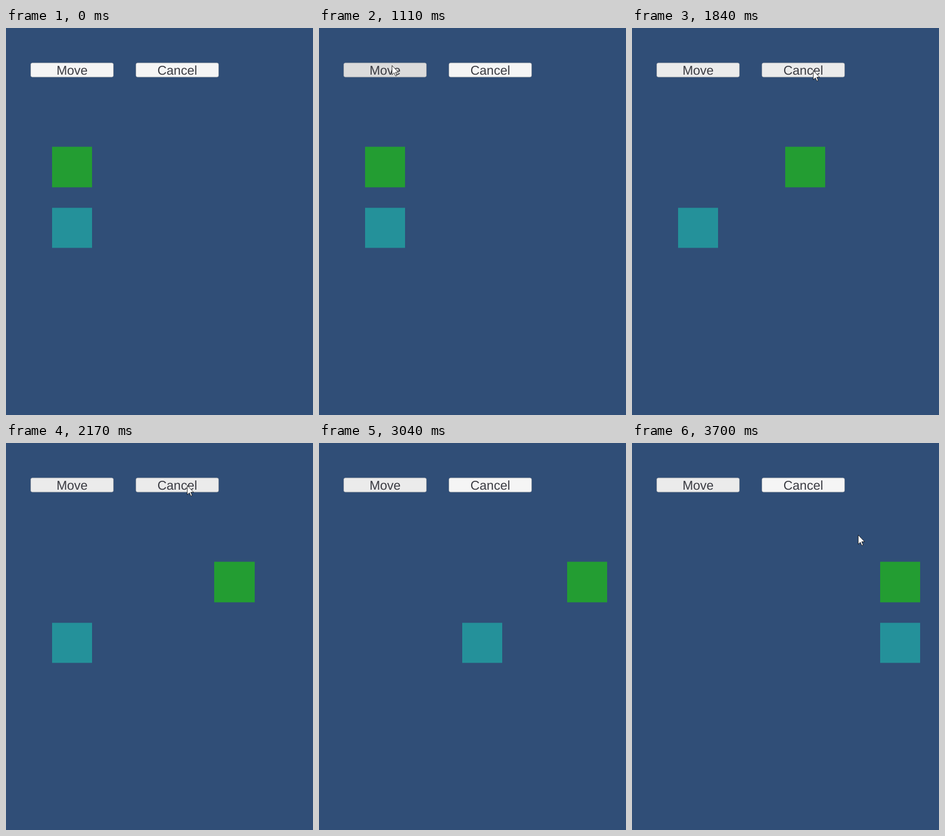
Recreate the animation shown at these times as an HTML page. Size 553 by 696 pixels, loop 3770 ms.

```html
<!DOCTYPE html>
<html lang="en">
<head>
<meta charset="utf-8">
<title>Move and Cancel</title>
<style>
  html, body { margin: 0; width: 100%; height: 100%; overflow: hidden; background: #304e77; }
  svg { display: block; width: 553px; height: 696px; }
  text {
    font: 23px "Liberation Sans", Arial, sans-serif;
    fill: #3a3b42;
    text-anchor: middle;
    text-rendering: geometricPrecision;
  }
  .button { stroke: #96989a; stroke-width: .6; }
</style>
</head>
<body>
<svg viewBox="0 0 553 696">
  <rect class="button" id="move" x="44.5" y="62.8" width="149" height="25.4" rx="3"/>
  <text x="119" y="84">Move</text>
  <rect class="button" id="cancel" x="234" y="62.8" width="149" height="25.4" rx="3"/>
  <text x="308.5" y="84">Cancel</text>
  <rect id="green" y="213.6" height="72.9" fill="#239d32"/>
  <rect id="teal" y="323.4" height="72" fill="#24919a"/>
  <path id="cursor" d="M.5 .5V17L4.3 13.5 7 19.4 9.4 18.4 6.8 12.6H12Z"
        fill="#fff" stroke="#000" stroke-width=".8"/>
</svg>
<script>
// The picture advances in steps, about fifteen per second.
const LOOP = 3770, START = 176, STEP = 66.4;
const SIZE = 72.5, LEFT = 82.7, TRAVEL = 363.9, SPEED = 19.9;
const NORMAL = 245, HOVER_DIP = 10, PRESS_DIP = 52;

const el = id => document.getElementById(id);
const ramp = (t, from, to) => Math.min(1, Math.max(0, (t - from) / (to - from)));
const smooth = u => u * u * (3 - 2 * u);

// Each glide leads from the previous resting place; lift bows its path upward.
const glides = [
  { from: 0, to: 7, x: 137, y: 75 },
  { from: 7, to: 10, x: 131, y: 67 },
  { from: 15, to: 18, x: 145, y: 72 },
  { from: 18, to: 21, x: 326, y: 76, lift: 24 },
  { from: 30, to: 33, x: 407, y: 165 }
];

function cursorAt(step) {
  let x = 386, y = 483;
  for (const g of glides) {
    const u = smooth(ramp(step, g.from, g.to));
    x += (g.x - x) * u;
    y += (g.y - y) * u - (g.lift || 0) * Math.sin(Math.PI * u);
  }
  return [Math.round(x), Math.round(y)];
}

function slide(id, step, start) {
  const x = LEFT + Math.min(TRAVEL, Math.max(0, step - start) * SPEED);
  const left = Math.round(x);
  el(id).setAttribute("x", left);
  el(id).setAttribute("width", Math.round(x + SIZE) - left);
}

function tint(id, dip) {
  const shade = Math.round(NORMAL - dip);
  el(id).setAttribute("fill", `rgb(${shade},${shade},${shade})`);
}

function draw(time) {
  const step = Math.floor((time % LOOP - START) / STEP);

  slide("green", step, 15.3);
  slide("teal", step, 34.2);

  const press = PRESS_DIP * ramp(step, 13, 15);
  const release = (PRESS_DIP - HOVER_DIP) * ramp(step, 15, 17);
  tint("move", press - release);
  tint("cancel", HOVER_DIP * (ramp(step, 19, 21) - ramp(step, 31, 33)));

  const visible = step >= 0 && step < 34 || step >= 53;
  el("cursor").setAttribute("transform", `translate(${cursorAt(step)})`);
  el("cursor").setAttribute("visibility", visible ? "visible" : "hidden");
}

let origin;
function tick(now) {
  origin ??= now;
  draw(now - origin);
  requestAnimationFrame(tick);
}
draw(0);
requestAnimationFrame(tick);
</script>
</body>
</html>
```
